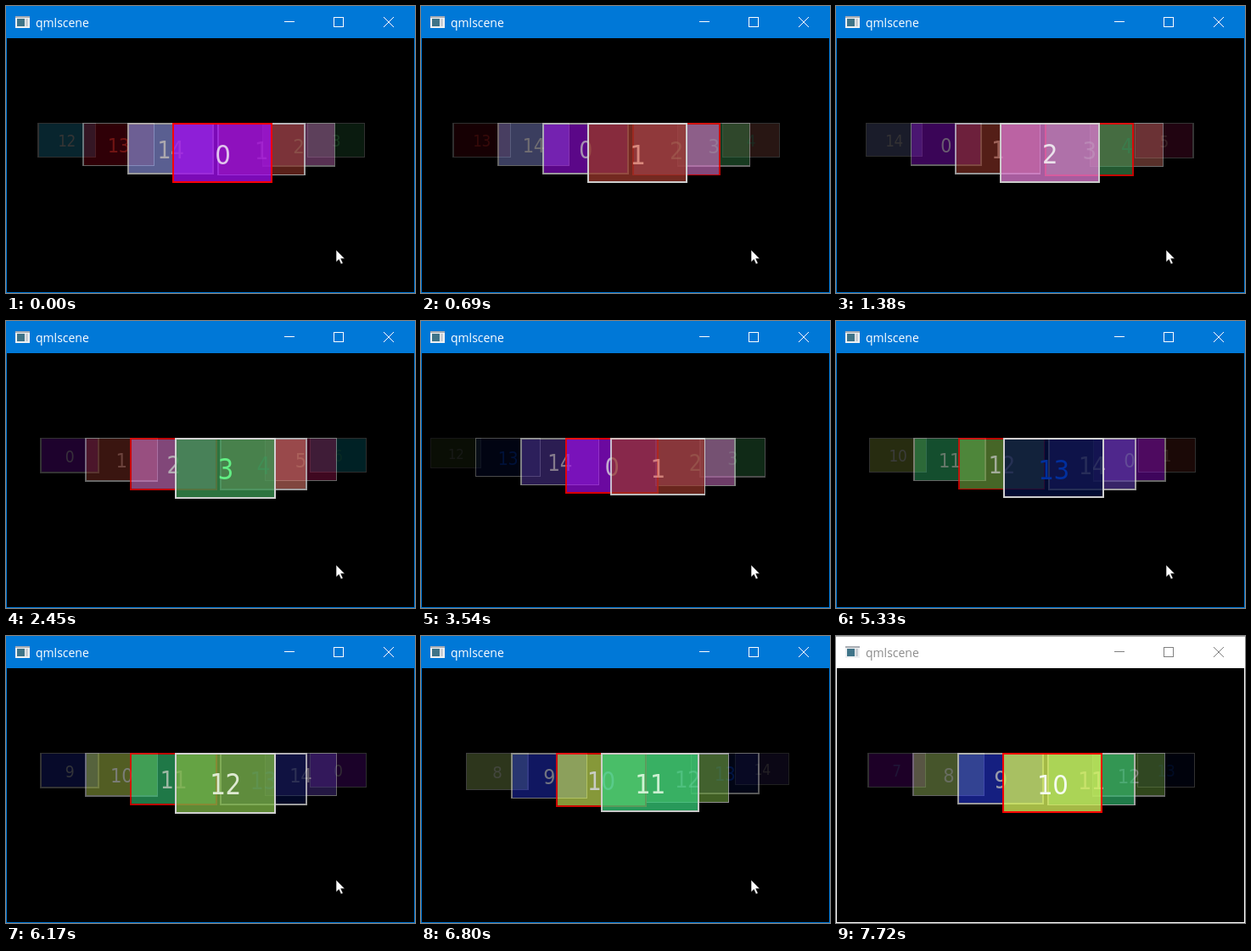
An HTML page for the animation above (7.8 s loop, 482 px wide and 339 px high).

```html
<!DOCTYPE html>
<html lang="en">
<head>
<meta charset="utf-8">
<title>qmlscene</title>
<style>
  html, body { margin: 0; width: 100%; height: 100%; overflow: hidden; background: #000; }
  svg { display: block; }
  .title { font: 14px "Open Sans", "Noto Sans", sans-serif; }
  .card text {
    font: 33px "DejaVu Sans Condensed", "DejaVu Sans", sans-serif;
    font-stretch: condensed;
    letter-spacing: -0.5px;
    text-anchor: middle;
  }
  .card rect { fill-opacity: .8; stroke-width: 2; shape-rendering: crispEdges; }
  .crisp { shape-rendering: crispEdges; }
</style>
</head>
<body>
<svg width="482" height="339" viewBox="0 0 482 339">
  <rect id="frame" width="482" height="339"/>
  <rect x="1" y="38" width="480" height="300"/>
  <rect id="edge" width="482" height="1"/>
  <g class="crisp">
    <rect x="11" y="12" width="17" height="14" fill="#eef0f2"/>
    <rect x="11" y="12" width="17" height="2" fill="#a9adb3"/>
    <rect x="13" y="15" width="9" height="9" fill="#3f7488"/>
    <rect x="23" y="15" width="3" height="9" fill="#c9ced4"/>
  </g>
  <text id="title" class="title" x="35" y="25">qmlscene</text>
  <g id="buttons" fill="none">
    <path class="crisp" d="M328 18.5h12M386.5 13.5h11v11h-11z"/>
    <path d="M445 13l12 12M457 13l-12 12"/>
  </g>
  <g id="cards"></g>
  <path id="cursor" d="M.5 .5V15l3.3-3.1 2.5 5.5 2.4-1.1-2.5-5.2h4.6z" fill="#fff" stroke="#000" stroke-width=".6"/>
</svg>
<script>
const LOOP = 7800, COUNT = 15, SLOTS = 7, MOVE_MS = 300;
const RETURN_AT = 2450, BLUR_AT = 7720;

// first change, last change, steps, motion already elapsed at the first step, direction
const moves = [
  [150, 460, 5, 36, 1], [690, 1070, 6, -24, 1], [1380, 1690, 5, 48, 1],
  [2450, 2760, 5, 50, -1], [2930, 3230, 5, 34, -1], [3460, 3690, 4, 74, -1],
  [4010, 4320, 5, 34, -1], [4470, 4780, 5, 20, -1], [5330, 5640, 5, 31, -1],
  [6170, 6480, 5, 50, -1], [6710, 7030, 5, 36, -1]
];

// fill and text colour of each card
const palette = [
  "#9e0eeb #e4c8f2", "#94362a #dc8a7c", "#da78cd #f2e8f2", "#3a9150 #62f084",
  "#d77669 #78b088", "#a51655 #d88890", "#00bed7 #28c0a4", "#a500dc #8a60f0",
  "#b9e173 #dce6cc", "#2636de #d0d4ea", "#d2ee5a #fafff4", "#36cb78 #d4f8dc",
  "#78af44 #e0ecd4", "#040f42 #0030a0", "#5c3eac #dccce8"
].map(s => s.split(" "));
// cards 12 to 14 before they leave the view for the first time
const early = ["#2dcdff #e8e8e8", "#7e0015 #f02c28", "#9ba5fa #eee8f0"].map(s => s.split(" "));

const $ = id => document.getElementById(id);
const make = (tag, parent) =>
  parent.appendChild(document.createElementNS("http://www.w3.org/2000/svg", tag));
const set = (el, attrs) => { for (const k in attrs) el.setAttribute(k, attrs[k]); };
const mod = (a, n) => ((a % n) + n) % n;
const clamp = v => Math.min(1, Math.max(0, v));
const easeInOutQuad = u => u < .5 ? 2 * u * u : 1 - 2 * (1 - u) ** 2;

const cards = palette.map((_, i) => {
  const group = make("g", $("cards"));
  group.setAttribute("class", "card");
  const box = make("rect", group), label = make("text", group);
  set(box, { x: 1, y: 1, width: 118, height: 70 });
  set(label, { x: 60, y: 49.5 });
  label.textContent = i;
  return { group, box, label };
});

function viewState(t) {
  let pos = 0, current = 0;
  for (const [first, last, steps, lead, dir] of moves) {
    if (t < first) break;
    const step = (last - first) / (steps - 1);
    const held = Math.min(steps - 1, Math.floor((t - first) / step + .05));
    const u = held === steps - 1 ? 1 : clamp((lead + held * step) / MOVE_MS);
    pos += dir * easeInOutQuad(u);
    current += dir;
  }
  return { pos, current: mod(current, COUNT) };
}

function drawCards(t) {
  const { pos, current } = viewState(t);
  const shown = [];
  cards.forEach((card, i) => {
    const rel = mod(i - pos + COUNT / 2, COUNT) - COUNT / 2;
    const p = .5 + rel / SLOTS;
    const visible = p >= 0 && p < 1;
    card.group.style.display = visible ? "" : "none";
    if (!visible) return;

    const x = 11 + 370 * p;
    const near = x < 201 ? (x - 11) / 190 : (381 - x) / 180;
    const [fill, ink] = t < RETURN_AT && i >= 12 ? early[i - 12] : palette[i];
    set(card.group, {
      transform: `translate(${x} 138) scale(${.5 + .5 * near})`,
      opacity: .1 + .9 * near
    });
    set(card.box, { fill, stroke: i === current ? "#f00" : "#d3d3d3" });
    set(card.label, { fill: ink });
    shown.push({ near, group: card.group });
  });
  shown.sort((a, b) => a.near - b.near).forEach(s => $("cards").appendChild(s.group));
}

function drawWindow(t) {
  const active = t < BLUR_AT;
  set($("frame"), { fill: active ? "#0078d7" : "#fff" });
  set($("edge"), { fill: active ? "#0078d7" : "#aaa" });
  set($("title"), { fill: active ? "#fff" : "#8c8c8c" });
  set($("buttons"), { stroke: active ? "#fff" : "#808080" });
}

function drawCursor(t) {
  const [x, y] = t < 7180 ? [388.5, 287.5] : t < 7260 ? [384, 302] : [374, 325];
  $("cursor").style.display = t < 7340 ? "" : "none";
  set($("cursor"), { transform: `translate(${x} ${y})` });
}

function render(t) {
  drawWindow(t);
  drawCards(t);
  drawCursor(t);
}

const start = performance.now();
function tick() {
  render((performance.now() - start) % LOOP);
  requestAnimationFrame(tick);
}
tick();
</script>
</body>
</html>
```
